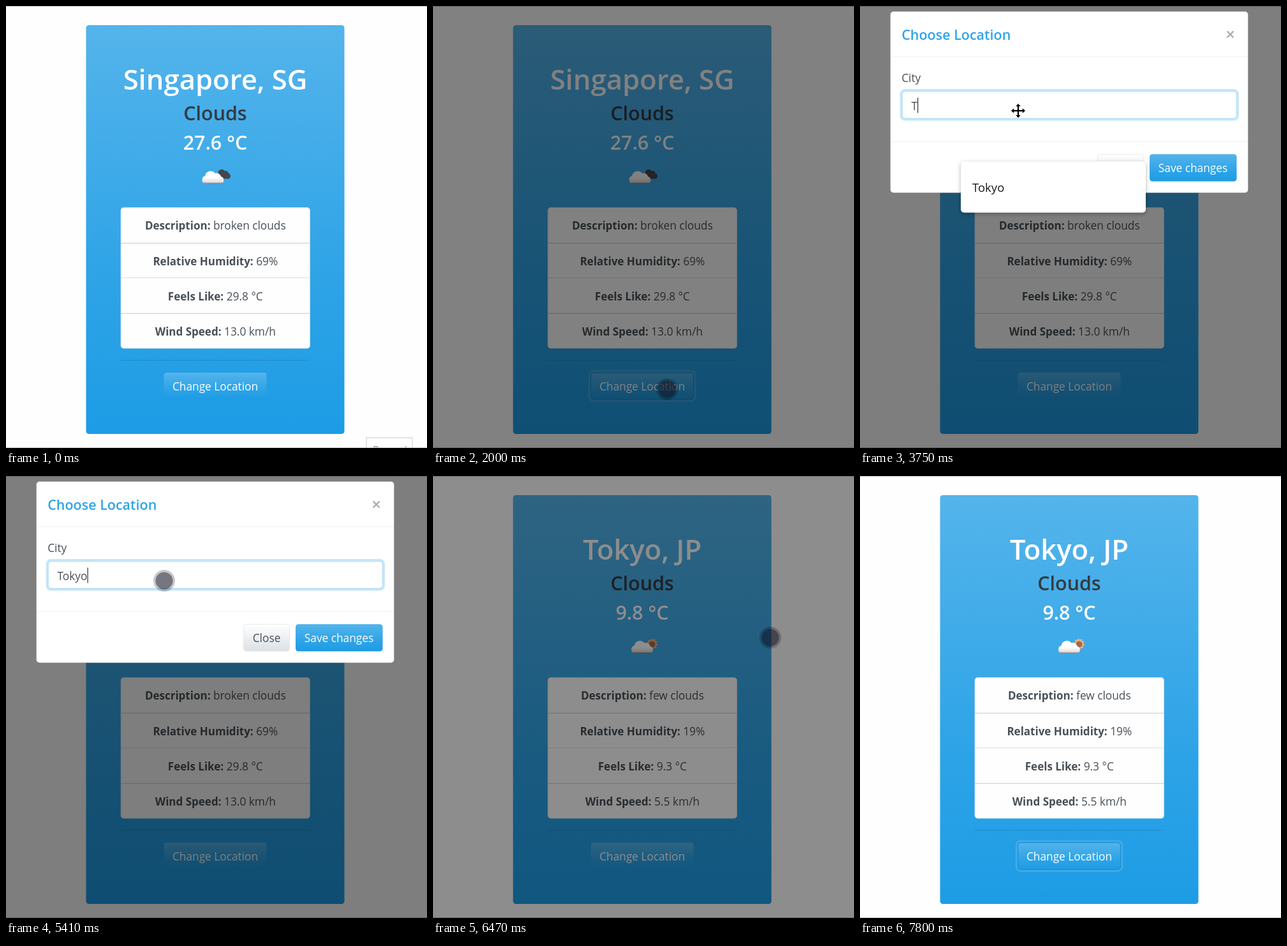
An HTML page for the animation above (8470 ms loop, 660 by 692 pixels).

```html
<!DOCTYPE html>
<html lang="en">
<head>
<meta charset="utf-8">
<title>Weather card</title>
<style>
  html, body { margin: 0; width: 100%; height: 100%; overflow: hidden; background: #fefefe; }
  svg { display: block; width: 660px; height: 692px; }
  text { font: 17.3px "Open Sans", "Noto Sans", sans-serif; fill: #495057; white-space: pre; }
  .mid { text-anchor: middle; }
  .bold { font-weight: 700; font-size: 17px; }
  .white { fill: #fff; }
  .place, .sky, .title { font-weight: 600; }
  .place { font-size: 43.6px; }
  .sky { font-size: 30.4px; }
  .dark { fill: #343a40; }
  .title { font-size: 21.5px; fill: #2fa4e7; }
  .option { font-size: 18.5px; font-weight: 500; fill: #16191d; }
  .popup { filter: drop-shadow(0 2px 3px rgba(0, 0, 0, .3)); }
</style>
</head>
<body>
<svg viewBox="0 0 660 692">
  <defs>
    <linearGradient id="blue" x2="0" y2="1">
      <stop stop-color="#54b4eb"/>
      <stop offset=".6" stop-color="#2fa4e7"/>
      <stop offset="1" stop-color="#1d9ce5"/>
    </linearGradient>
    <linearGradient id="pale" x2="0" y2="1">
      <stop stop-color="#fff"/>
      <stop offset="1" stop-color="#dce1e5"/>
    </linearGradient>
    <linearGradient id="puff" x2="0" y2="1">
      <stop offset=".5" stop-color="#fff"/>
      <stop offset=".85" stop-color="#e3e0e2"/>
      <stop offset="1" stop-color="#77737a"/>
    </linearGradient>
    <path id="cloud" d="M6.5 21A6.5 6.5 0 0 1 6 8.5A9 9 0 0 1 22 4.5A7 7 0 0 1 31 9.5A6 6 0 0 1 31 21Z"/>
  </defs>

  <rect width="660" height="692" fill="#fefefe"/>
  <rect width="660" height="1" fill="#bfbfbf"/>
  <g id="badge">
    <rect x="565" y="676" width="72" height="30" fill="#fff" stroke="#e3e3e3" stroke-width="2"/>
    <text class="mid" x="602" y="701" style="font-size:16.5px;fill:#888">Record</text>
  </g>
  <rect y="691" width="660" height="1" fill="#bfbfbf"/>

  <rect x="125.5" y="30" width="405" height="640" rx="4.5" fill="url(#blue)"/>
  <text id="place" class="mid place white" x="328" y="130.5"></text>
  <text class="mid sky dark" x="328" y="179">Clouds</text>
  <text id="temp" class="mid sky white" x="328" y="225"></text>

  <g id="broken">
    <use href="#cloud" transform="translate(328.5 255) scale(.66 .74)" fill="#45454e"/>
    <use href="#cloud" x="306" y="257.5" fill="url(#puff)"/>
  </g>
  <g id="few">
    <circle cx="343.5" cy="263" r="7" fill="#f0b67a" stroke="#f0b67a" stroke-width="3" stroke-dasharray="2.2 2.2"/>
    <circle cx="343.5" cy="263.5" r="5" fill="#a9654f"/>
    <use href="#cloud" x="309.5" y="257" fill="url(#puff)"/>
  </g>

  <rect x="180" y="315.5" width="296.5" height="220.5" rx="4.5" fill="#fefefe" stroke="#c9dfec" stroke-width=".8"/>
  <path d="M180 371.3H476.5M180 481.3H476.5" stroke="#c3c9cd"/>
  <path d="M180 425.5H476.5" stroke="#dfdfdf"/>
  <g id="rows"></g>
  <path d="M180 554.7H476.5" stroke="#000" stroke-opacity=".1" stroke-width="1.3"/>

  <rect id="ring" x="245.3" y="571.8" width="165.4" height="46.4" rx="6.5" fill="none" stroke="#54b4eb" stroke-opacity=".55" stroke-width="3.4"/>
  <rect x="247.5" y="574" width="161" height="42" rx="4" fill="url(#blue)"/>
  <rect id="edge" x="247.5" y="574" width="161" height="42" rx="4" fill="none" stroke="#178acd"/>
  <text class="mid white" x="328" y="602">Change Location</text>

  <rect id="shade" width="660" height="692"/>

  <g id="modal">
    <rect x="47.5" y="8.5" width="561" height="284" rx="5" fill="#fff" stroke="#000" stroke-opacity=".15"/>
    <text class="title" x="65.2" y="53">Choose Location</text>
    <path d="M575.5 39.5l10 10m0-10l-10 10" stroke="#a6abaf" stroke-width="2.4"/>
    <path d="M48 79H608M48 212.3H608" stroke="#eceef0"/>
    <text x="65.2" y="119">City</text>
    <rect id="focus" x="64.3" y="131.8" width="527.9" height="46" rx="6" fill="none" stroke="#2fa4e7" stroke-opacity=".27" stroke-width="3.4"/>
    <rect id="field" x="66.2" y="133.8" width="524" height="42.2" rx="4.5" fill="#fff"/>
    <text id="typed" x="80.5" y="162.5"></text>
    <rect id="caret" y="143.5" width="1.2" height="24" fill="#333"/>
    <rect x="372.5" y="232.2" width="72" height="42" rx="4" fill="url(#pale)" stroke="#e6e9ec"/>
    <text class="mid" x="408.5" y="260">Close</text>
    <rect x="454" y="232" width="136.5" height="42.5" rx="4.5" fill="url(#blue)"/>
    <text class="mid white" x="522" y="260">Save changes</text>
  </g>

  <g id="popup">
    <rect id="panel" class="popup" x="158" y="243.5" width="290" rx="5" fill="#fff"/>
    <g id="options"></g>
  </g>

  <g id="touch">
    <circle r="17" fill="#000" fill-opacity=".22"/>
    <circle id="dot" r="13.5" fill="#14142a" fill-opacity=".45"/>
  </g>
  <path id="arrows" transform="translate(248 164)" stroke="#fff" stroke-width=".8"
    d="M0-11.5l4.5 5h-3v5h5v-3l5 4.5l-5 4.5v-3h-5v5h3l-4.5 5l-4.5-5h3v-5h-5v3l-5-4.5l5-4.5v3h5v-5h-3z"/>
</svg>

<script>
const LOOP = 8470;
const $ = id => document.getElementById(id);
const show = (id, on) => $(id).setAttribute("visibility", on ? "visible" : "hidden");
const within = (t, from, to) => t >= from && t < to;
const ramp = (t, from, length) => Math.min(1, Math.max(0, (t - from) / length));
const easeOut = p => 1 - (1 - p) ** 1.7;

const cities = [
  { place: "Singapore, SG", temp: "27.6 °C", values: ["broken clouds", "69%", "29.8 °C", "13.0 km/h"] },
  { place: "Tokyo, JP", temp: "9.8 °C", values: ["few clouds", "19%", "9.3 °C", "5.5 km/h"] }
];
const labels = ["Description", "Relative Humidity", "Feels Like", "Wind Speed"];
const baselines = [350, 406, 461, 516];
const suggestions = ["Tokyo", "Singapore", "London", "Paris", "Sydney"];

// Pointer strokes: [ms, x, y]; each one rests at its end until its closing time.
const strokes = [
  { until: 3080, path: [[1080, 516, 650], [1300, 440, 630], [1500, 385, 606], [1680, 367, 600],
    [2130, 367, 600], [2320, 357, 430], [2500, 320, 270], [2620, 268, 190], [2740, 248, 164]] },
  { until: 7800, path: [[5410, 248, 164], [5600, 330, 185], [5800, 455, 228], [5960, 534, 252], [6210, 530, 253],
    [6340, 530, 253], [6560, 528, 253], [7270, 528, 253], [7420, 553, 288], [7600, 640, 485], [7780, 643, 671]] }
];
const keys = [[0, ""], [3750, "T"], [4090, "To"], [4150, "Tok"], [4290, "Toky"], [4350, "Tokyo"]];
const caretTimes = [[3080, 3560], [3750, 4880], [5410, 5940]];

function along(path, t) {
  const i = path.findIndex(p => p[0] > t);
  if (i < 0) return path[path.length - 1].slice(1);
  const [a, b] = [path[i - 1], path[i]];
  const p = ramp(t, a[0], b[0] - a[0]);
  return [a[1] + (b[1] - a[1]) * p, a[2] + (b[2] - a[2]) * p];
}

let shownCity = -1;
function setCity(n) {
  if (n === shownCity) return;
  shownCity = n;
  const city = cities[n];
  $("place").textContent = city.place;
  $("temp").textContent = city.temp;
  $("rows").innerHTML = labels.map((label, i) =>
    `<text class="mid" x="328.3" y="${baselines[i]}"><tspan class="bold">${label}:</tspan> ${city.values[i]}</text>`).join("");
  show("broken", n === 0);
  show("few", n === 1);
}

function drawModal(t) {
  const closing = t > 6000;
  const p = closing ? ramp(t, 6305, 150) : 1 - ramp(t, 2002, 150);
  const lift = closing ? easeOut(ramp(t, 6305, 300)) : 1 - easeOut(ramp(t, 2002, 300));
  $("modal").setAttribute("opacity", 1 - p);
  $("modal").setAttribute("transform", `translate(0 ${-50 * lift})`);
  $("shade").setAttribute("opacity", .5 * (ramp(t, 1852, 150) - ramp(t, 6455, 140)));
  show("modal", within(t, 2002, 6455));

  const focused = within(t, 3080, 6455);
  show("focus", focused);
  $("field").setAttribute("stroke", focused ? "#a5d8f6" : "#d8dcdf");
  const typed = keys.filter(k => k[0] <= t).pop()[1];
  $("typed").textContent = typed;
  const width = typed ? $("typed").getComputedTextLength() : 0;
  $("caret").setAttribute("x", 80.5 + width);
  show("caret", caretTimes.some(c => within(t, ...c)));
}

function drawPopup(t) {
  const count = t < 3750 ? suggestions.length : 1;
  show("popup", within(t, 3150, 4620));
  $("popup").setAttribute("opacity", ramp(t, 3150, 60) - ramp(t, 4480, 140));
  $("panel").setAttribute("height", 39 + 41 * count);
  [...$("options").children].forEach((el, i) => el.setAttribute("display", i < count ? "inline" : "none"));
}

function drawPointer(t) {
  const stroke = strokes.find(s => within(t, s.path[0][0], s.until));
  show("touch", stroke);
  if (stroke) $("touch").setAttribute("transform", `translate(${along(stroke.path, t)})`);
  const pressed = within(t, 1740, 1870) || within(t, 2810, 2940) || within(t, 6210, 6340);
  $("dot").setAttribute("fill-opacity", pressed ? .55 : .45);
  show("arrows", within(t, 3080, 5410));
}

function render(t) {
  show("badge", t < 70);
  setCity(t < 6470 ? 0 : 1);
  const focused = within(t, 1800, 2390) || t >= 6730;
  show("ring", focused);
  show("edge", focused);
  drawModal(t);
  drawPopup(t);
  drawPointer(t);
}

$("options").innerHTML = suggestions.map((name, i) =>
  `<text class="option" x="176" y="${290.5 + 41 * i}">${name}</text>`).join("");

let start;
function tick(now) {
  start ??= now;
  render((now - start) % LOOP);
  requestAnimationFrame(tick);
}
render(0);
requestAnimationFrame(tick);
</script>
</body>
</html>
```
